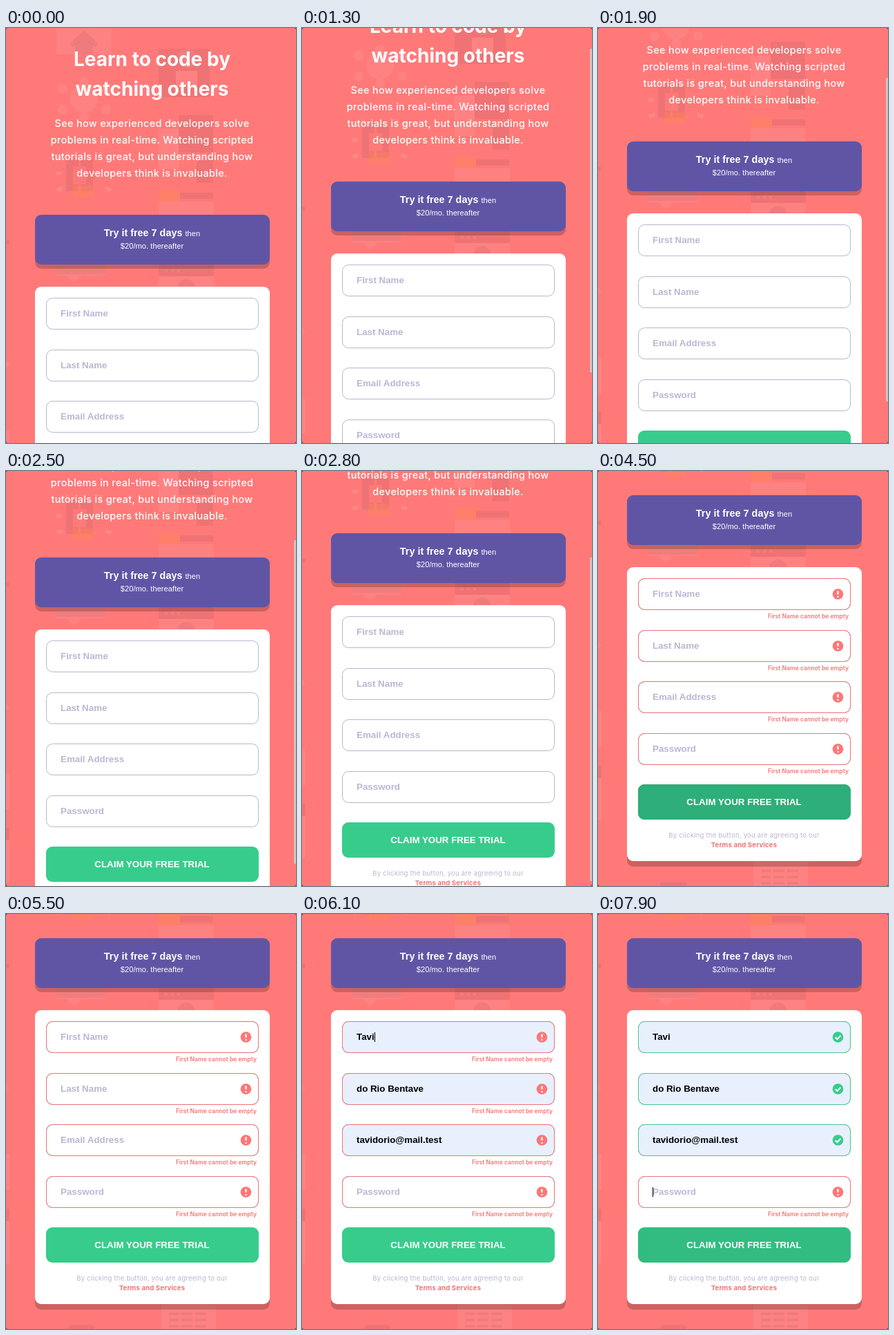
These frames come from a looping animation (420x600 px, 8000 ms). An HTML page:

```html
<!DOCTYPE html>
<html lang="en">
<head>
<meta charset="utf-8">
<title>Sign-up form</title>
<style>
  html, body { margin: 0; width: 100%; height: 100%; overflow: hidden; background: #4a3a3a; }
  svg { display: block; width: 420px; height: 600px; }
  .geo { font-family: Inter, "Open Sans", sans-serif; }
  .ui { font: bold 13.333px "Liberation Sans", Arial, sans-serif; }
  .mid { text-anchor: middle; }
  .title { font-size: 28px; font-weight: 700; fill: #fff; }
  .intro { font-size: 14.4px; font-weight: 500; letter-spacing: .35px; fill: #fff; }
  .terms { font-size: 9.6px; letter-spacing: .2px; fill: #bab7d4; }
  .link { font-weight: 700; letter-spacing: .15px; fill: #f07474; }
  .error { font-size: 8.6px; font-weight: 600; fill: #f47676; text-anchor: end; }
  .small { font-size: 11.2px; font-weight: 400; }
  .hint { fill: #bab7d4; }
  .dark { fill: #503c46; fill-opacity: .09; }
  .light { fill: #fff; fill-opacity: .07; }
  .warm { fill: #ff8a4c; fill-opacity: .35; }
  .ray { stroke: #fff; stroke-opacity: .1; stroke-width: 5; fill: none; }
  .shade { fill: #000; fill-opacity: .2; }
</style>
</head>
<body>
<svg viewBox="0 0 420 600">
  <rect width="420" height="600" rx="3" fill="#ff7979"/>
  <g id="page">
    <g id="pattern">
      <path class="light" d="M73-40H153V38H73Z"/>
      <path class="dark" d="M92 23L113 3L134 23L129 28L113 13L97 28Z"/>
      <path class="dark" d="M100 24L113 13L126 24V38H100Z"/>
      <path class="dark" fill-rule="evenodd" d="M221 30H295V100H221ZM246 62V84H277V62Z"/>
      <path class="light" d="M246 62H277V84H246Z"/>
      <circle class="light" cx="262" cy="44" r="14"/>
      <g class="light">
        <circle cx="113" cy="102" r="20"/>
        <circle cx="113" cy="79" r="7"/><circle cx="82" cy="88" r="7"/>
        <circle cx="145" cy="88" r="7"/><circle cx="82" cy="118" r="7"/>
        <circle cx="145" cy="118" r="7"/><circle cx="113" cy="128" r="7"/>
      </g>
      <path class="dark" d="M250 126H300V180H250ZM276 190H300V224H276Z"/>
      <path class="light" d="M221 146H250V204H221Z"/>
      <path class="dark" d="M87 190H105V200H97V226H105V236H87ZM108 190H126V236H108V226H116V200H108Z"/>
      <path class="ray" d="M74 185L82 189M73 210H81M74 235L82 231M152 185L144 189M153 210H145M152 235L144 231M88 180L91 187M138 180L135 187"/>
      <path class="warm" d="M97 228H126V244H97ZM221 234H252V251H221Z"/>
      <path class="dark" d="M252 238H300V247H252Z"/>
      <path class="light" d="M221 251H301V271H221Z"/>
      <path class="dark" d="M221 271H301V342H221Z"/>
      <path class="dark" d="M73 342H107V356H73ZM107 342H144V356H107Z"/>
      <path class="light" d="M73 342H144V358H110L98 368L88 358H73Z"/>
      <path class="dark" d="M221 342H301V359H221Z"/>
      <path class="light" d="M221 359H301V440H221ZM230 349h4v4h-4zM239 349h4v4h-4zM248 349h4v4h-4z"/>
      <circle class="dark" cx="261" cy="376" r="13"/>
      <path class="dark" d="M0 307H5V313H0ZM0 661H5V679H0Z"/>
      <path class="light" d="M0 480L5 487L0 493ZM0 582H5V634H0ZM0 679H5V740H0Z"/>
      <path class="light" d="M225 800H304V860H225Z"/>
      <path class="dark" d="M236 811h14v4h-14zM254 811h16v4h-16zM274 811h16v4h-16zM236 820h14v4h-14zM254 820h16v4h-16zM274 820h16v4h-16zM236 829h14v4h-14zM254 829h16v4h-16zM274 829h16v4h-16z"/>
      <path class="dark" d="M90 835V832Q92 829 96 829H122Q127 829 128 832V835Z"/>
    </g>

    <g class="geo mid">
      <text class="title" x="211.5" y="55">Learn to code by</text>
      <text class="title" x="211.5" y="98">watching others</text>
      <g class="intro">
        <text x="211.5" y="143">See how experienced developers solve</text>
        <text x="211.5" y="167">problems in real-time. Watching scripted</text>
        <text x="211.5" y="191">tutorials is great, but understanding how</text>
        <text x="211.5" y="215">developers think is invaluable.</text>
      </g>
    </g>

    <rect class="shade" x="42" y="276" width="340" height="72" rx="9"/>
    <rect x="42" y="270" width="340" height="72" rx="9" fill="#6055a5"/>
    <g class="ui mid" fill="#fff">
      <text x="211.5" y="301" font-size="14.4" style="font-size:14.4px">Try it free 7 days <tspan class="small">then</tspan></text>
      <text class="small" x="211.5" y="319">$20/mo. thereafter</text>
    </g>

    <rect class="shade" x="42" y="382" width="340" height="425" rx="9"/>
    <rect x="42" y="374" width="340" height="425" rx="9" fill="#fff"/>
    <g id="fields"></g>
    <rect x="58" y="688" width="308" height="51" rx="9" fill="#38cc8c"/>
    <rect id="hover" x="58" y="688" width="308" height="51" rx="9" fill="#2eae78"/>
    <text class="ui mid" x="211.5" y="718" fill="#fff">CLAIM YOUR FREE TRIAL</text>
    <g class="geo mid terms">
      <text x="211.5" y="765">By clicking the button, you are agreeing to our</text>
      <text class="link" x="211.5" y="779">Terms and Services</text>
    </g>
  </g>
  <rect id="scrollbar" x="417" width="5" height="468" rx="2" fill="#cdc4c4"/>
</svg>
<script>
const LOOP = 8000, STEP = 100;
const CLICK = 4300, FOCUS = 5800, FILL = 6100, BLUR = 6500, RESUBMIT = 7600;

// [time, value] pairs, linear in between
const SCROLL = [[1100, 0], [1200, 14], [1300, 48], [1400, 76], [1600, 92], [1700, 100],
  [1900, 106], [2100, 106], [2500, 145], [3000, 204], [3200, 204], [3300, 210], [3500, 235]];
const HOVER = [[3700, 0], [4000, 1], [5200, 1], [5500, 0], [7200, 0], [7500, 1], [7700, 1], [7900, .5]];
const BAR = [[1100, 0], [1200, 1], [3700, 1], [4000, 0]];
const RED = [[CLICK - 100, 0], [CLICK + 200, 1]];
const GREEN = [[RESUBMIT - 100, 0], [RESUBMIT + 200, 1]];

const FIELDS = [
  ["First Name", "Tavi"],
  ["Last Name", "do Rio Bentave"],
  ["Email Address", "tavidorio@mail.test"],
  ["Password", ""],
];

const $ = id => document.getElementById(id);

function at(keys, t) {
  if (t <= keys[0][0]) return keys[0][1];
  for (let i = 1; i < keys.length; i++) {
    const [t0, a] = keys[i - 1], [t1, b] = keys[i];
    if (t <= t1) return a + (b - a) * (t - t0) / (t1 - t0);
  }
  return keys[keys.length - 1][1];
}

const box = (name, stroke) =>
  `<rect class="${name}" x="58.5" y=".5" width="307" height="45" rx="9" fill="none" stroke="${stroke}"/>`;

$("fields").innerHTML = FIELDS.map(([hint]) => `
  <g>
    ${box("base", "#b9b6cf")}${box("red", "#ee7276")}${box("green", "#45c796")}
    <text class="ui value" x="79" y="27">${hint}</text>
    <path class="caret" d="M79.5 16V30" stroke="#000"/>
    <g class="bad">
      <circle cx="347.5" cy="23" r="7.8" fill="#fc7777"/>
      <path d="M347.5 18.5V23.5M347.5 26V28" stroke="#fff" stroke-width="2.2"/>
      <text class="geo error" x="363" y="58">First Name cannot be empty</text>
    </g>
    <g class="good">
      <circle cx="347.5" cy="23" r="7.8" fill="#38cc8c"/>
      <path d="M343.8 23.2L346.5 26L351.4 20.7" fill="none" stroke="#fff" stroke-width="2"/>
    </g>
  </g>`).join("");

const rows = [...$("fields").children].map((row, i) => {
  row.setAttribute("transform", `translate(0 ${Math.round(390 + i * 74.67)})`);
  return name => row.querySelector("." + name);
});

const show = (el, amount) => el.setAttribute("opacity", +amount);

function drawField(part, i, t) {
  const [hint, value] = FIELDS[i];
  const filled = value && t >= FILL;
  const valid = filled && t >= RESUBMIT;
  const green = value ? at(GREEN, t) : 0;
  const text = part("value");

  text.textContent = filled ? value : hint;
  text.setAttribute("fill", filled ? "#000" : "#bab7d4");
  part("base").setAttribute("fill", filled ? "#e8f0fe" : "#fff");
  show(part("red"), at(RED, t) * (1 - green));
  show(part("green"), green);
  show(part("bad"), t >= CLICK && !valid);
  show(part("good"), valid);

  const focused = i === 0 ? t >= FOCUS && t < BLUR : i === 3 && t >= RESUBMIT;
  show(part("caret"), focused);
  if (focused) {
    const offset = filled ? Math.round(text.getComputedTextLength()) : 0;
    part("caret").setAttribute("transform", `translate(${offset} 0)`);
  }
}

function draw(now) {
  const t = Math.floor(now % LOOP / STEP) * STEP;
  const scroll = Math.round(at(SCROLL, t));
  $("page").setAttribute("transform", `translate(0 ${-scroll})`);
  $("scrollbar").setAttribute("y", Math.round(scroll * .72 - 4.5));
  show($("scrollbar"), at(BAR, t));
  show($("hover"), at(HOVER, t));
  rows.forEach((part, i) => drawField(part, i, t));
}

let start;
function frame(now) {
  start ??= now;
  draw(now - start);
  requestAnimationFrame(frame);
}
draw(0);
requestAnimationFrame(frame);
</script>
</body>
</html>
```
